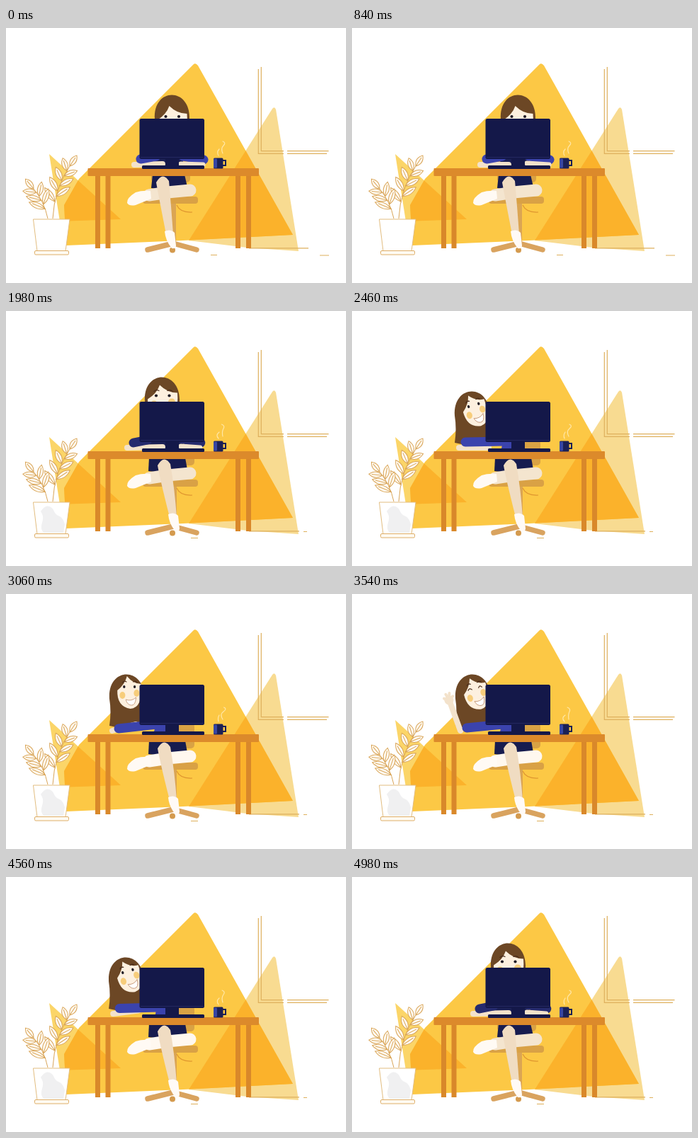
Animation, 480 px wide and 360 px high, one loop 5040 ms. Source, as an HTML page:

```html
<!DOCTYPE html>
<html lang="en">
<head>
<meta charset="utf-8">
<title>Wave from the desk</title>
<style>
  html, body { margin: 0; width: 100%; height: 100%; overflow: hidden; background: #fff; }
  svg { display: block; width: 100vw; height: 100vh; }
  .line { fill: none; stroke: #deb05c; stroke-width: 1.2; }
  .limb { fill: none; stroke: #f3e2cb; stroke-linecap: round; stroke-linejoin: round; }
</style>
</head>
<body>
<svg viewBox="0 0 480 360">
  <defs>
    <path id="big" d="M264 52Q267 48 271 53L405 292L250 300L85 307L82 250L103 213Z"/>
    <path id="right" d="M376 114Q379 110 381 115L413 315L340 310L258 300Z"/>
    <path id="left" d="M61 178L162 270L76 273Z"/>
    <clipPath id="inBig"><use href="#big"/></clipPath>
  </defs>

  <use href="#right" fill="#f8db91"/>
  <use href="#left" fill="#fbd568"/>
  <use href="#big" fill="#fcc845"/>
  <g clip-path="url(#inBig)" fill="#fbb22b"><use href="#right"/><use href="#left"/></g>

  <path class="line" d="M356.3 58V177.3H392M397 177.3H453M360.3 55V173.7H392M397 173.7H455.5"/>
  <path class="line" id="floorEarly" d="M289 320.5H298M343 310.8H427M443 321H456"/>
  <path class="line" id="floorLate" d="M261 320.5H271M343 310.8H414M420 311.5H425"/>

  <g id="leaves" fill="#fffaf1" stroke="#d9a558"/>
  <path d="M38.5 270H90L84 315H44Z" fill="#fff" stroke="#e2bd80"/>
  <path id="potShade" d="M49 283C56 272 64 274 68 283S79 286 83 301L81 313H53C44 302 58 296 49 283Z" fill="#f0f0f1"/>
  <rect x="40.5" y="314.5" width="48" height="5.5" rx="1.5" fill="#fffaf1" stroke="#deae68"/>

  <rect id="chairBack" y="182" width="55" height="36" rx="5" fill="#d9a244"/>
  <rect id="post" y="246" width="8" height="60" fill="#dba553"/>
  <path d="M200 313L236 304L269 313" fill="none" stroke="#d9a35f" stroke-width="7.5" stroke-linecap="round" stroke-linejoin="round"/>
  <circle cx="235" cy="313.5" r="4" fill="#d49a4e"/>
  <rect x="193" y="238" width="78" height="10" rx="4" fill="#d9a145"/>
  <path d="M241 250Q246 261 263 260" fill="none" stroke="#df9630" stroke-width="1.2"/>

  <path id="skirt" fill="#171c4f"/>
  <path id="crossLeg" class="limb" stroke-width="17" d="M260 229L228 232L202 236"/>
  <path d="M204 230Q192 229 183 232Q170 240 171 247Q174 252 183 250L205 241Z" fill="#fffaf4"/>
  <path id="frontLeg" fill="#f0dcc2"/>
  <path id="shoe" d="M-7 -14Q1 -18 7 -12L9 6Q9 11 3 10Q-6 -1 -7 -14Z" fill="#fffaf6"/>

  <path id="torso"/>
  <path id="hair" d="M-24 10C-27 -36 27 -36 25 10V40Q20 51 6 50Q-10 52 -24 48Q-21 28 -24 10Z" fill="#6c4725"/>
  <g id="face">
    <path d="M-21 5Q-8 -3 -4 -15Q7 -4 21 -4Q24 30 2 31Q-22 28 -21 5Z" fill="#fdf0df"/>
    <g fill="#f7cd7b"><circle cx="-12" cy="12" r="5"/><circle cx="13" cy="9" r="5"/></g>
    <g fill="none" stroke="#4a2d1c" stroke-width="1.3" stroke-linecap="round">
      <path id="brows" d="M-12 -6Q-9 -9 -5 -7M7 -7Q11 -9 14 -6"/>
      <path id="shutEyes" d="M-12 1Q-9 -3 -5 1M7 1Q10 -3 13 1"/>
    </g>
    <g id="openEyes" fill="#1f1a25"><circle cx="-9" r="2.1"/><circle cx="9.5" r="2.1"/></g>
    <path id="smile" d="M-6 18Q4 21 12 15Q11 27 3 26Q-4 25 -6 18Z" fill="#fff" stroke="#b98562" stroke-width=".8"/>
  </g>

  <path d="M129.5 207V311M144 207V311M327.5 207V311M342.5 207V311" stroke="#d9882a" stroke-width="7"/>
  <rect x="115.5" y="198" width="241.5" height="11" rx="1" fill="#dc8a2b"/>

  <path id="rightSleeve" class="limb" stroke-width="13"/>
  <path id="rightForearm" class="limb" stroke-width="7"/>
  <path id="leftForearm" class="limb" stroke-width="8"/>
  <path id="leftSleeve" class="limb" stroke-width="13"/>
  <g id="palm" class="limb" stroke-width="4">
    <path d="M-5 -7L0 0V-9M5 -5L0 1M0 3L-7 -1"/>
    <circle r="4.5" cy="1" style="fill: #f3e2cb"/>
  </g>

  <g fill="#141849">
    <rect x="188.5" y="128" width="91.5" height="57" rx="2.5"/>
    <rect x="225" y="184" width="19" height="11"/>
    <rect x="192" y="194" width="88" height="5" rx="1.5"/>
    <path d="M190 182.5H279" stroke="#242861"/>
  </g>

  <path d="M305 187H310V194H305" fill="none" stroke="#1b2055" stroke-width="2"/>
  <rect x="293" y="183.5" width="13.5" height="15" rx="1.5" fill="#1b2055"/>
  <rect x="293" y="184.5" width="5" height="13" rx="1" fill="#3746a2"/>
  <path id="steam" fill="none" stroke="#ffe7a8" stroke-width="1.2" stroke-linecap="round"/>
</svg>

<script>
const LOOP = 5040, STEP = 60;
const $ = id => document.getElementById(id);
const set = (id, attrs) => {
  for (const name in attrs) $(id).setAttribute(name, attrs[name]);
};
const show = (id, on) => set(id, { visibility: on ? 'visible' : 'hidden' });
const mix = (a, b, u) => a + (b - a) * u;
const ramp = (t, from, to) => {
  const u = Math.min(1, Math.max(0, (t - from) / (to - from)));
  return u * u * (3 - 2 * u);
};

// A curved stem with leaves on alternating sides and one at the tip.
function branch(x0, y0, cx, cy, x1, y1, count) {
  const at = (a, c, b, u) => mix(mix(a, c, u), mix(c, b, u), u);
  let out = `<path fill="none" d="M${x0} ${y0}Q${cx} ${cy} ${x1} ${y1}"/>`;
  for (let i = 0; i < count; i++) {
    const u = mix(.3, 1, i / (count - 1));
    const tangent = Math.atan2(mix(cy - y0, y1 - cy, u), mix(cx - x0, x1 - cx, u)) * 180 / Math.PI;
    const turn = i === count - 1 ? 0 : i % 2 ? 42 : -48;
    const size = mix(27, 18, u);
    out += `<path transform="translate(${at(x0, cx, x1, u)} ${at(y0, cy, y1, u)}) rotate(${tangent + turn})"
      d="M0 0Q${size / 2} -8 ${size} 0Q${size / 2} 8 0 0H${size * .8}"/>`;
  }
  return out;
}
$('leaves').innerHTML = branch(66, 269, 68, 228, 90, 195, 8) + branch(59, 269, 54, 245, 39, 227, 6);

// head: x y; face: offset from head, turn, width; arm: shoulder, elbow, hand
const work = { head: [234, 119], face: [.5, 6, 0, 1], arm: [212, 181, 188, 186, 221, 192] };
const peek = { head: [220, 118], face: [1, 1.5, 0, 1], arm: [200, 182, 178, 187, 221, 191] };
const lean = { head: [169, 138], face: [2.5, -5, -17, .8], arm: [215, 184, 158, 186, 193, 193] };
const reach = { head: [170, 138], face: [4, -7, 0, .8], arm: [213, 184, 157, 191, 183, 184] };
const wave = { head: [170, 138], face: [3, -5, -15, .8], arm: [213, 184, 160, 190, 132, 149] };
const timeline = [
  [0, work], [1680, work], [1980, peek], [2340, lean], [2880, lean], [3060, reach],
  [3420, wave], [4320, wave], [4620, lean], [4980, peek], [LOOP, work]
];

function poseAt(t) {
  const i = timeline.findIndex(([time]) => time > t);
  const [from, a] = timeline[i - 1], [to, b] = timeline[i];
  const u = ramp(t, from, to);
  const blend = part => a[part].map((v, k) => mix(v, b[part][k], u));
  return { head: blend('head'), face: blend('face'), arm: blend('arm') };
}

function drawHead(t, [x, y], [dx, dy, turn, width], leaning) {
  const shut = t > 3480 && t < 4440;
  set('hair', { transform: `translate(${x} ${y})` });
  set('face', { transform: `translate(${x + dx} ${y + dy}) rotate(${turn}) scale(${width} 1)` });
  show('shutEyes', shut);
  show('openEyes', !shut);
  show('brows', x < 230);
  show('smile', leaning);
}

function drawArms(t, headX, [sx, sy, ex, ey, hx, hy], leaning) {
  const sleeve = headX > 190 && headX < 230 ? '#262b6e' : '#3b43ad';
  const typing = leaning ? 0 : Math.sin(t / 60);
  const swing = t > 3420 && t < 4320 ? Math.sin((t - 3420) / 900 * Math.PI * 4) * 5 : 0;
  const rightElbow = 279 - (234 - headX) * .3;

  set('torso', { d: `M${sx} 176H${leaning ? 225 : 250}V199H${sx - 5}Z`, fill: leaning ? sleeve : '#1b2055' });
  set('leftSleeve', { d: `M${sx} ${sy}L${ex + 2} ${ey - 1}`, stroke: sleeve });
  set('leftForearm', { d: `M${ex - 7} ${Math.min(ey + 7, 193)}L${hx + swing} ${hy + typing}` });
  set('palm', { transform: `translate(${hx + swing} ${hy}) rotate(${swing * 3 - 12})` });
  show('palm', t > 3180 && t < 4500);

  set('rightSleeve', { d: `M250 181L${rightElbow} 186`, style: `stroke: ${sleeve}` });
  set('rightForearm', { d: `M${rightElbow - 1} 193L247 ${192 - typing}` });
  $('leftSleeve').style.stroke = sleeve;
  show('rightSleeve', !leaning);
  show('rightForearm', !leaning);
}

function drawSeat(t) {
  const shift = ramp(t, 1680, 1980) - ramp(t, 4620, 4980);
  const footX = 231 + shift * 5, hip = 221 + shift * 2;
  set('chairBack', { x: 205 + shift * 6 });
  set('post', { x: 232 + shift });
  set('skirt', { d: `M${207 - shift * 5} 207H${252 + shift}L256 224L240 231L${205 - shift * 4} 226Z` });
  $('crossLeg').style.stroke = t > 2700 && t < 4620 ? '#fff8ef' : '#f4e5cf';
  set('frontLeg', {
    d: `M${hip - 9} 218Q${hip} 202 ${hip + 9} 216Q${footX + 2} 250 ${footX + 5} 291H${footX - 5}Q${hip - 5} 240 ${hip - 9} 218Z`
  });
  set('shoe', { transform: `translate(${footX} 301)` });
}

function draw(t) {
  const { head, face, arm } = poseAt(t);
  const leaning = head[0] < 195, late = t > 1700;
  drawHead(t, head, face, leaning);
  drawArms(t, head[0], arm, leaning);
  drawSeat(t);
  show('floorEarly', !late);
  show('floorLate', late);
  show('potShade', late);
  const drift = Math.sin(t / LOOP * Math.PI * 12) * 2;
  set('steam', {
    d: `M300 180Q${297 - drift} 175 301 171M306 177Q${303 + drift} 170 307 166T${306 - drift} 160`
  });
}

function tick(now) {
  draw(Math.floor(now % LOOP / STEP) * STEP);
  requestAnimationFrame(tick);
}
draw(0);
requestAnimationFrame(tick);
</script>
</body>
</html>
```
